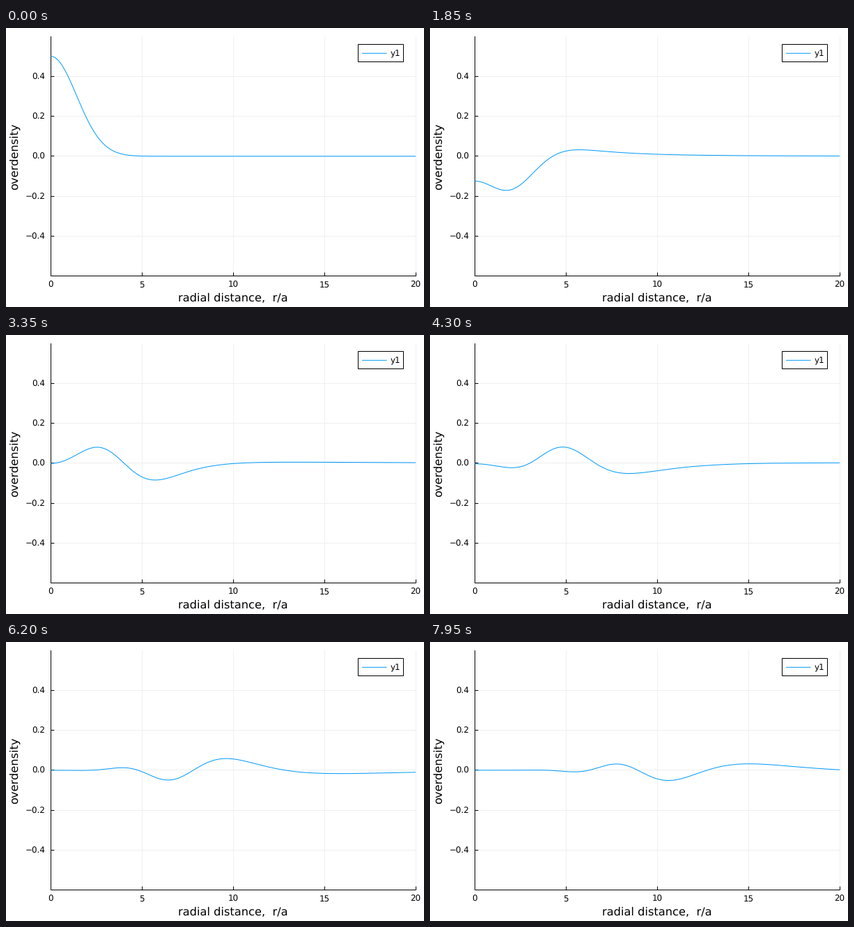
These frames come from a looping animation (600x400 px, 8000 ms). A matplotlib script:

```python
import matplotlib.pyplot as plt
import numpy as np
from matplotlib.animation import FuncAnimation
from matplotlib.patches import Rectangle

W, H, DPI = 600, 400, 100
PX = 72 / DPI                      # points per pixel
LEFT, RIGHT, TOP, BOTTOM = 64.3, 588.1, 12, 355.5
ZERO, UNIT = 183.9, 286.67         # pixel row of y = 0, pixels per unit
BLUE = "#009AFA"
FRAMES, INTERVAL, DT = 160, 50, 0.124

plt.rcParams["font.family"] = "DejaVu Sans"
plt.rcParams["text.hinting"] = "none"

fig = plt.figure(figsize=(W / DPI, H / DPI), dpi=DPI, facecolor="white")
ax = fig.add_axes([0, 0, 1, 1])
ax.set_xlim(0, W)
ax.set_ylim(H, 0)
ax.axis("off")


def px(r):
    return LEFT + (RIGHT - LEFT) * r / 20


def py(value):
    return ZERO - UNIT * value


def mid(v):
    """Centre of the pixel holding v."""
    return np.floor(v) + 0.5


def stroke(xs, ys, color="black", z=3):
    return ax.plot(xs, ys, color=color, lw=PX, zorder=z, snap=False,
                   solid_capstyle="butt", solid_joinstyle="round")[0]


def label(x, y, text, size=11.85, **kw):
    ax.text(x, y, text, fontsize=size * PX, color="black", zorder=6,
            **{"ha": "center", "va": "baseline", **kw})


# Grid, ticks and tick labels
for r in range(0, 21, 5):
    x = mid(px(r))
    if r:
        stroke([x, x], [TOP, BOTTOM], "#efefef", 1)
    stroke([x, x], [BOTTOM, BOTTOM - 5])
    label(px(r), 372, str(r))
for value in (-0.4, -0.2, 0.0, 0.2, 0.4):
    y = mid(py(value))
    stroke([LEFT, RIGHT], [y, y], "#efefef", 1)
    stroke([LEFT, LEFT + 5], [y, y])
    label(56.5, py(value) + 4.4, f"{value:.1f}".replace("-", "−"), ha="right")

# Axes and their titles
stroke([64.5, 64.5], [TOP, BOTTOM + 0.5])
stroke([64, mid(RIGHT) + 0.5], [BOTTOM, BOTTOM])
label(326.2, 392, "radial distance,  r/a", 16.3)
label(16.7, 184, "overdensity", 16.3, rotation=90, ha="right",
      va="center", rotation_mode="default") if False else ax.text(
    16.7, 184, "overdensity", fontsize=16.3 * PX, rotation=90,
    rotation_mode="anchor", ha="center", va="baseline")

# Legend
ax.add_patch(Rectangle((505.5, 23.5), 65, 25, fc="white", ec="black",
                       lw=PX, zorder=4, snap=False))
stroke([511, 546.5], [36.3, 36.3], BLUE, 5)
label(551.2, 40.5, "y1", ha="left")


# Dispersive wave, omega^2 = k, from the pulse 0.5 exp(-r^2 / 4).
# With k = s^2 the Hankel integral becomes smooth in s.
r = np.linspace(0, 20, 301)
s = np.linspace(0, 2.1, 421)
kr = np.outer(r, s**2)
angles = (np.arange(64) + 0.5) * np.pi / 128
bessel = sum(np.cos(kr * np.sin(a)) for a in angles) / len(angles)
kernel = bessel * (2 * s**3 * np.exp(-s**4) * (s[1] - s[0]))

curve = stroke(px(r), py(0 * r), BLUE, 3.5)
curve.set_clip_path(Rectangle((64, TOP), RIGHT - 64, BOTTOM - TOP,
                              transform=ax.transData))


def draw(i):
    curve.set_ydata(py(kernel @ np.cos(s * i * DT)))
    return (curve,)


anim = FuncAnimation(fig, draw, frames=FRAMES, interval=INTERVAL,
                     init_func=lambda: draw(0), repeat=True, repeat_delay=0)
plt.show()
```
